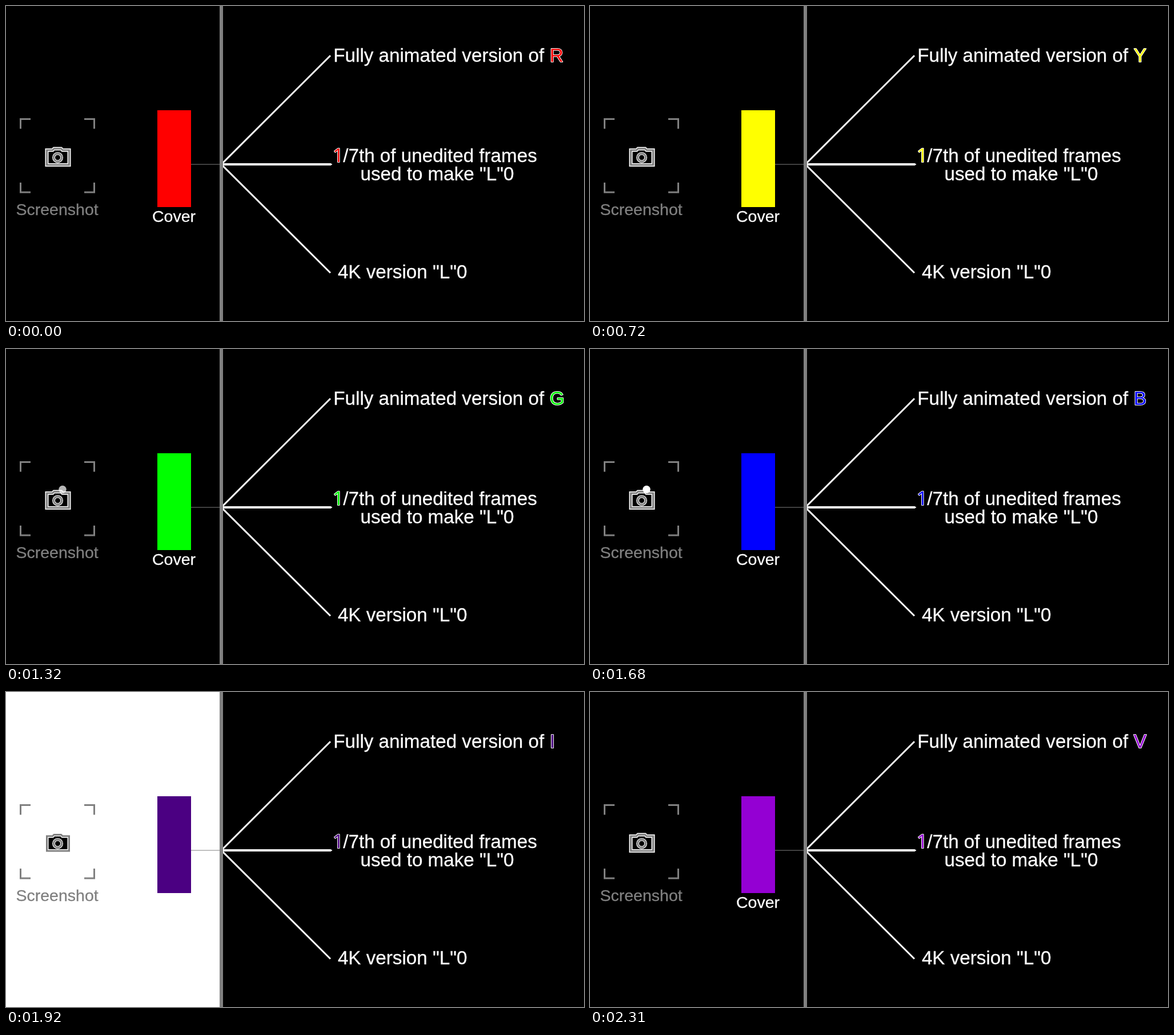
An HTML page for the animation above (2700 ms loop, 1012 by 553 pixels).

```html
<!DOCTYPE html>
<html lang="en">
<head>
<meta charset="utf-8">
<style>
  html, body { margin: 0; height: 100%; overflow: hidden; background: #000; }
  svg { display: block; width: 1012px; height: 553px; }
  text { font: 33.2px "Liberation Sans", Arial, sans-serif; fill: #fff; stroke: #fff; stroke-width: .3; white-space: pre; }
  .small { font-size: 28.5px; }
  .hue { stroke-width: 2; paint-order: stroke; stroke-linejoin: round; }
  #one { font-family: "Open Sans", sans-serif; }
  .edge { fill: none; stroke: #fff; stroke-width: 6; }
  .core { fill: none; stroke: #808080; stroke-width: 3; }
</style>
</head>
<body>
<svg viewBox="0 0 1012 553">
  <defs>
    <path id="body" d="M71.5 253H81.5L84 250.5H96.5L99 253H110.5V279H71.5Z"/>
    <circle id="lens" cx="90.5" cy="266" r="7"/>
  </defs>
  <rect id="flash" width="374" height="553" fill="#fff"/>

  <path d="M24 198.5H43M25.5 197V215.5M137 198.5H156M154.5 197V215.5M24 327H43M25.5 328.5V310M137 327H156M154.5 328.5V310"
    fill="none" stroke="#808080" stroke-width="3"/>
  <use href="#body" fill="#000"/>
  <use href="#body" class="edge"/>
  <use href="#body" class="core"/>
  <use href="#lens" class="edge" style="stroke-width:5"/>
  <use href="#lens" class="core"/>
  <circle id="dot" cx="99" cy="246.5" r="6.75" fill="#fff"/>
  <text class="small" x="17.5" y="367" style="fill:#808080;stroke:#808080">Screenshot</text>

  <rect id="cover" x="265" y="183" width="59" height="170"/>
  <text class="small" x="256" y="379">Cover</text>
  <path d="M324 278H375" stroke="#808080"/>

  <path d="M568 87L377 278L568 468.5" fill="none" stroke="#fff" stroke-width="3"/>
  <path d="M377 276H568.5L571.5 278L568.5 280H377Z" fill="#fff"/>
  <rect x="374" width="6" height="553" fill="#808080"/>

  <text x="573.3" y="98">Fully animated version of</text>
  <text id="letter" class="hue" x="952" y="98"></text>
  <text id="one" class="hue" x="572" y="274">1</text>
  <text x="590.3" y="274">/7th of unedited frames</text>
  <text x="620.5" y="306">used to make "L"0</text>
  <text x="580.9" y="478">4K version "L"0</text>
</svg>
<script>
  const LOOP = 2700;
  const hues = [
    [0, "R", "#ff0000"], [360, "O", "#ff8000"], [720, "Y", "#ffff00"], [1110, "G", "#00ff00"],
    [1500, "B", "#0000ff"], [1890, "I", "#4b0082"], [2310, "V", "#9400d3"]
  ];
  const dotSteps = [960, 1080, 1200, 1320, 1470, 1680];
  const [flash, dot, cover, letter, one] =
    ["flash", "dot", "cover", "letter", "one"].map(id => document.getElementById(id));

  function draw(now) {
    const t = now % LOOP;
    const [, name, color] = hues.findLast(h => h[0] <= t);
    letter.textContent = name;
    for (const el of [letter, one, cover]) el.style.fill = color;

    // The light brightens in sevenths, then the flash fires and it goes out.
    const lit = dotSteps.filter(s => s <= t).length;
    dot.style.opacity = lit && t < 1920 ? (lit + 1) / 7 : 0;
    flash.style.opacity = t >= 1920 && t < 1950 ? 1 : 0;
  }

  let start;
  function tick(now) {
    start ??= now;
    draw(now - start);
    requestAnimationFrame(tick);
  }
  draw(0);
  requestAnimationFrame(tick);
</script>
</body>
</html>
```
